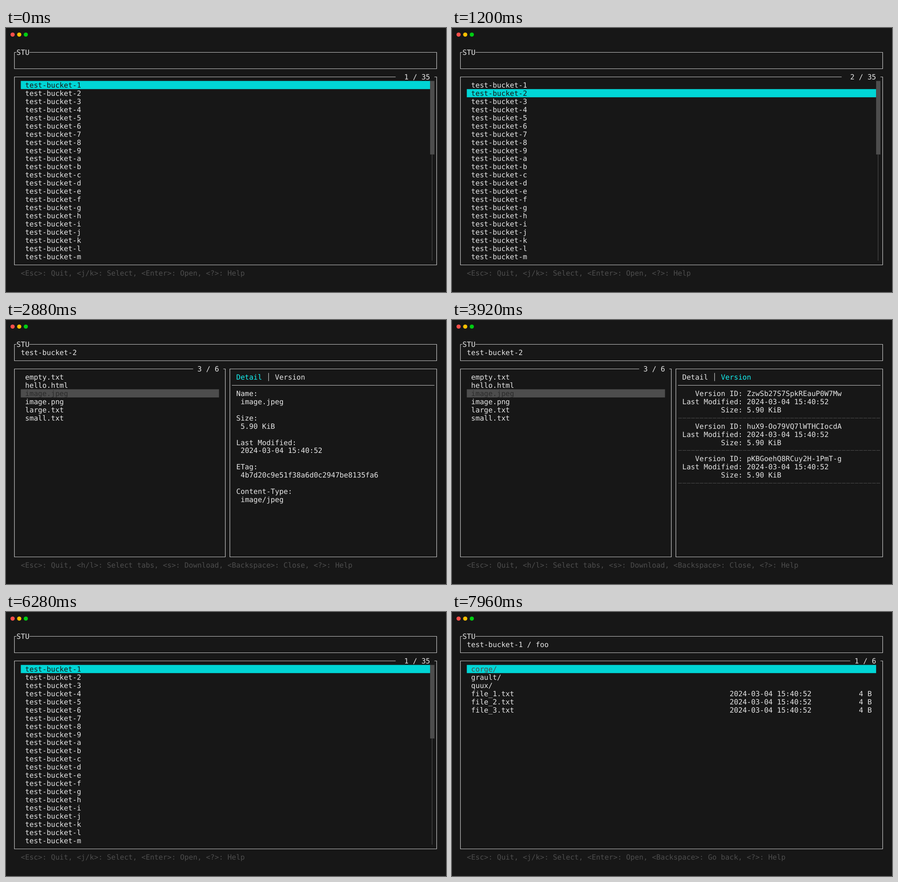
Recreate the animation shown at these times as an HTML page. Size 966 by 580 pixels, loop 8 s.

```html
<!DOCTYPE html>
<html lang="en">
<head>
<meta charset="utf-8">
<title>Bucket browser</title>
<style>
  html, body { margin: 0; width: 100%; height: 100%; overflow: hidden; background: #171717; }
  svg { display: block; width: 966px; height: 580px; }
  text {
    font: 15.71px "DejaVu Sans Mono", monospace;
    white-space: pre;
    text-rendering: geometricPrecision;
  }
</style>
</head>
<body>
<svg viewBox="0 0 966 580">
  <rect width="966" height="580" fill="#171717"/>
  <circle cx="14.5" cy="14.5" r="4.6" fill="#ff4f4b"/>
  <circle cx="29" cy="14.5" r="4.6" fill="#ffc000"/>
  <circle cx="43.5" cy="14.5" r="4.6" fill="#00cd12"/>
  <g id="terminal"></g>
</svg>
<script>
const layer = document.getElementById('terminal');
const LOOP = 8000;
const BG = '#171717', FG = '#e6e6e6', DIM = '#4d4d4d', LINE = '#c6c6c6';
const CYAN = '#00d6d6', BRIGHT = '#14f0f0';

// Terminal grid: cell edges and centres in pixels
const CW = 9.459, RH = 17.95;
const colX = c => 13.6 + c * CW;
const rowY = r => 44.5 + r * RH;
const snap = v => Math.floor(v) + 0.5;
const midX = c => snap(colX(c + 0.5));
const midY = r => snap(rowY(r + 0.5));

function add(tag, attrs, content) {
  const el = document.createElementNS('http://www.w3.org/2000/svg', tag);
  for (const key in attrs) el.setAttribute(key, attrs[key]);
  if (content !== undefined) el.textContent = content;
  layer.appendChild(el);
}

function write(col, row, str, fill = FG, bold = false) {
  add('text', { x: colX(col), y: rowY(row) + 14.6, fill, 'font-weight': bold ? 700 : 400 }, str);
}

function fillCells(col, row, cols, rows, fill) {
  add('rect', { x: colX(col), y: rowY(row), width: cols * CW, height: rows * RH, fill });
}

function stroke(d, color = LINE, extra = {}) {
  add('path', { d, fill: 'none', stroke: color, 'stroke-width': 1.2, ...extra });
}

// Frame whose top edge is open between two columns
function panel(c0, r0, c1, r1, gapFrom = c0 + 1, gapTo = gapFrom) {
  const x0 = midX(c0), y0 = midY(r0);
  stroke(`M${colX(gapTo)} ${y0}H${midX(c1)}V${midY(r1)}H${x0}V${y0}H${colX(gapFrom)}`);
}

const DATE = '2024-03-04 15:40:52';
const file = (name, size) => ({ name, size });
const dir = name => ({ name, dir: true });
const small = [1, 2, 3].map(n => file(`file_${n}.txt`, '4 B'));

const buckets = [...'123456789abcdefghijklm'].map(ch => ({ name: 'test-bucket-' + ch }));
const files = [
  file('empty.txt', '0 B'), file('hello.html', '203 B'), file('image.jpeg', '5.90 KiB'),
  file('image.png', '1.87 KiB'), file('large.txt', '1.05 MiB'), file('small.txt', '4 B')
];
const rootDir = [dir('bar/'), dir('baz/'), dir('foo/'), ...small];
const fooDir = [dir('corge/'), dir('grault/'), dir('quux/'), ...small];

const HELP = {
  buckets: '<Esc>: Quit, <j/k>: Select, <Enter>: Open, <?>: Help',
  objects: '<Esc>: Quit, <j/k>: Select, <Enter>: Open, <Backspace>: Go back, <?>: Help',
  detail: '<Esc>: Quit, <h/l>: Select tabs, <s>: Download, <Backspace>: Close, <?>: Help'
};

function header(path, help) {
  panel(0, 0, 98, 2, 1, 4);
  write(1, 0, 'STU');
  write(2, 1, path);
  write(2, 27, help, DIM);
}

function list(items, sel, total, lastCol, active) {
  const num = String(sel).padStart(String(total).length);
  const title = ` ${num} / ${total} `;
  const start = lastCol - title.length;
  panel(0, 3, lastCol, 26, start, lastCol);
  write(start, 3, title);
  items.forEach((item, i) => {
    const row = 4 + i, on = i + 1 === sel;
    if (on) fillCells(2, row, lastCol - 3, 1, active ? CYAN : DIM);
    const color = !on ? FG : item.dir ? DIM : active ? BG : '#2b2b2b';
    write(3, row, item.name, color, item.dir);
    if (active && item.size) {
      write(63, row, DATE, color);
      write(96 - item.size.length, row, item.size, color);
    }
  });
}

function bucketView(sel) {
  header('', HELP.buckets);
  list(buckets, sel, 35, 98, true);
  stroke(`M${midX(97)} ${rowY(13)}V${rowY(26)}`, DIM);
  fillCells(97, 4, 1, 9, DIM);
}

function objectView(path, items, sel) {
  header(path, HELP.objects);
  list(items, sel, items.length, 98, true);
}

function detailTab() {
  [
    ['Name:', 'image.jpeg'],
    ['Size:', '5.90 KiB'],
    ['Last Modified:', DATE],
    ['ETag:', '4b7d20c9e51f38a6d0c2947be8135fa6'],
    ['Content-Type:', 'image/jpeg']
  ].forEach(([label, value], i) => {
    write(52, 6 + 3 * i, label, FG, true);
    write(53, 7 + 3 * i, value);
  });
}

function versionTab() {
  const ids = ['ZzwSb27S7SpkREauP0W7Mw', 'huX9-Oo79VQ7lWTHCIocdA', 'pKBGoehQ8RCuy2H-1PmT-g'];
  ids.forEach((id, i) => {
    const row = 6 + 4 * i;
    [['Version ID:', id], ['Last Modified:', DATE], ['Size:', '5.90 KiB']].forEach(([label, value], j) => {
      write(66 - label.length, row + j, label, FG, true);
      write(67, row + j, value);
    });
    stroke(`M${colX(51) + 0.7} ${midY(row + 3)}H${colX(98)}`, DIM, { 'stroke-dasharray': `8 ${CW - 8}` });
  });
}

function detailView(version) {
  header('test-bucket-2', HELP.detail);
  list(files, 3, 6, 49, false);
  panel(50, 3, 98, 26);
  write(52, 4, 'Detail', version ? FG : BRIGHT, !version);
  stroke(`M${midX(59)} ${rowY(4)}V${rowY(5)}`);
  write(61, 4, 'Version', version ? BRIGHT : FG, version);
  stroke(`M${colX(51)} ${midY(5)}H${colX(98)}`);
  if (version) versionTab(); else detailTab();
}

function loadingBox() {
  const x = midX(34), y = midY(12);
  fillCells(34, 12, 30, 5, BG);
  add('rect', {
    x, y, width: midX(63) - x, height: midY(16) - y, rx: 5,
    fill: BG, stroke: LINE, 'stroke-width': 1.2
  });
  write(44, 14, 'Loading...');
}

const inFiles = sel => () => objectView('test-bucket-2', files, sel);
const inRoot = sel => () => objectView('test-bucket-1', rootDir, sel);
const inBuckets = sel => () => bucketView(sel);
const busy = view => () => { view(); loadingBox(); };

// Start time in ms and the view shown from then on
const steps = [
  [0, inBuckets(1)],
  [680, inBuckets(2)],
  [920, inBuckets(3)],
  [1200, inBuckets(2)],
  [1560, busy(inBuckets(2))],
  [1600, inFiles(1)],
  [2360, inFiles(2)],
  [2600, inFiles(3)],
  [2880, () => detailView(false)],
  [3920, () => detailView(true)],
  [4640, () => detailView(false)],
  [5360, inFiles(3)],
  [5880, inBuckets(2)],
  [6280, inBuckets(1)],
  [6640, busy(inBuckets(1))],
  [6680, inRoot(1)],
  [7440, inRoot(2)],
  [7720, inRoot(3)],
  [7920, busy(inRoot(3))],
  [7960, () => objectView('test-bucket-1 / foo', fooDir, 1)]
];

let shown = null;
function draw(time) {
  const [, view] = steps.findLast(([start]) => start <= time);
  if (view === shown) return;
  shown = view;
  layer.replaceChildren();
  view();
}

function tick() {
  draw(performance.now() % LOOP);
  requestAnimationFrame(tick);
}
tick();
</script>
</body>
</html>
```
